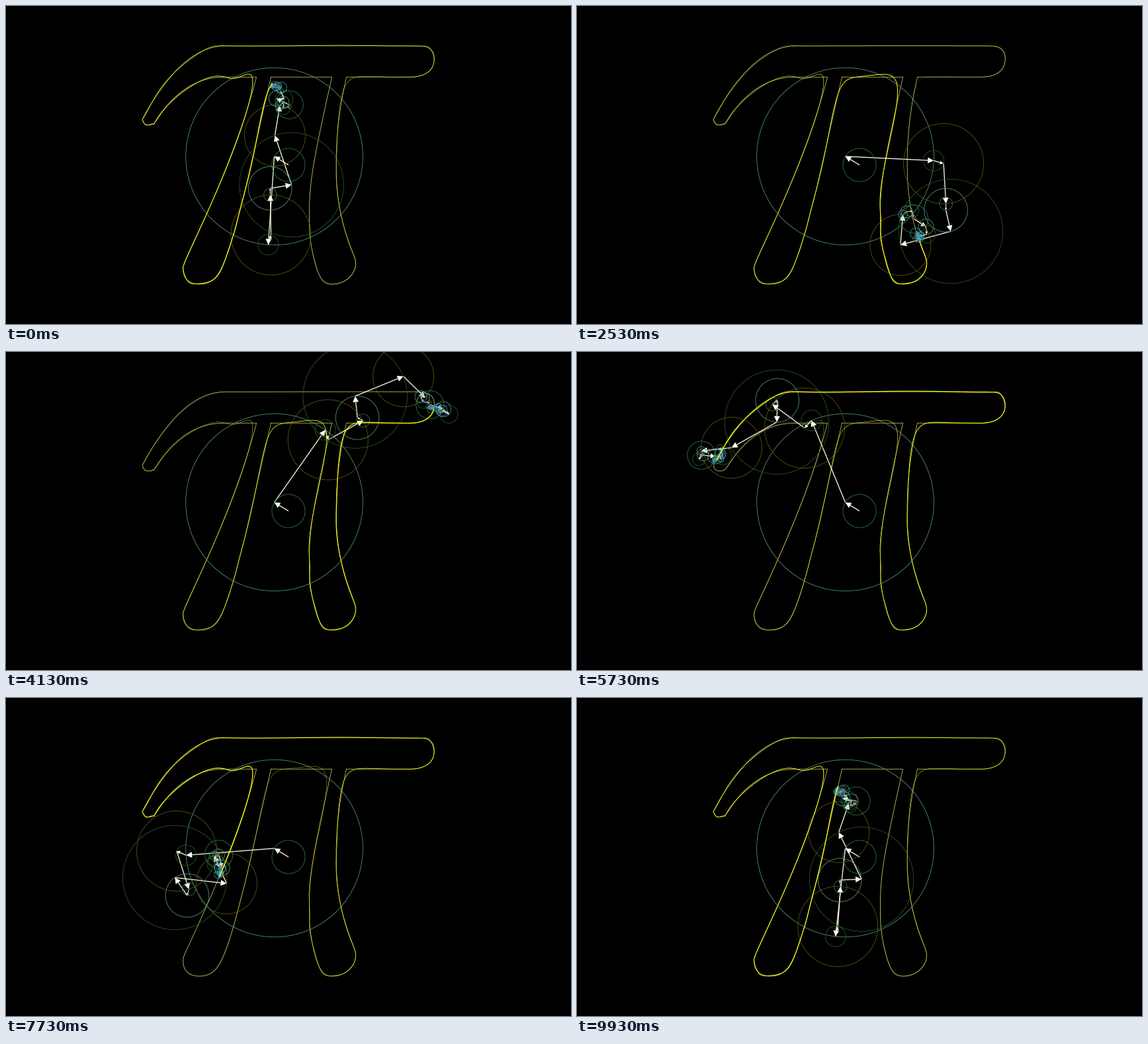
These frames come from a looping animation (854x480 px, 9.99 s). A matplotlib script:

```python
import numpy as np
import matplotlib.pyplot as plt
from matplotlib.animation import FuncAnimation
from matplotlib.collections import EllipseCollection, LineCollection, PolyCollection

W, H, DPI = 854, 480, 64           # a power of two keeps the size exact
FRAMES, LOOP_MS = 150, 9990
PT = 72 / DPI                      # points per pixel
MAX_FREQ = 25
PIECES, PIECE_STEPS = 300, 5
TIP, MAX_TIP_RATIO = 9, 0.35

# Glyph outline in font units, y down. One point makes a line, three a cubic.
START = (265, -373)
RIGHT_LEG = [
    [(378, -373)],
    [(345, -226), (336, -182), (336, -115)],
    [(336, -100), (336, -74), (344, -39)],
    [(354, 5), (365, 11), (380, 11)],
    [(400, 11), (422, -6), (422, -27)],
    [(422, -33), (422, -35), (416, -49)],
    [(386, -121), (386, -187), (386, -215)],
    [(386, -267), (393, -321), (405, -373)],
]
BAR = [
    [(518, -373)],
    [(532, -373), (568, -373), (568, -408)],
    [(568, -431), (546, -431), (527, -431)],
    [(191, -431)],
    [(169, -431), (132, -431), (88, -384)],
    [(53, -345), (27, -299), (27, -295)],
    [(27, -293), (27, -284), (39, -284)],
    [(47, -284), (49, -288), (55, -296)],
    [(103, -373), (162, -373), (182, -373)],
]
LEFT_LEG = [
    [(238, -373)],
    [(207, -252), (152, -132), (110, -41)],
    [(102, -25), (102, -23), (102, -16)],
    [(102, 5), (119, 11), (133, 11)],
    [(165, 11), (174, -19), (187, -53)],
    [(201, -100), (201, -102), (215, -154)],
    [START],
]


def to_plane(point):
    """Font units to pixels around the stage centre, y up."""
    x, y = point
    return complex(x - 297.5, -(y + 210)) * 360 / 442


def outline(steps):
    """Sample the glyph, giving every segment the same share of time."""
    s = np.arange(steps) / steps
    a, parts = to_plane(START), []
    for seg in RIGHT_LEG + BAR + LEFT_LEG:
        pts = [to_plane(p) for p in seg]
        d = pts[-1]
        b, c = pts[:2] if len(pts) == 3 else (a + (d - a) / 3, a + 2 * (d - a) / 3)
        parts.append(a * (1 - s)**3 + 3 * b * s * (1 - s)**2
                     + 3 * c * s**2 * (1 - s) + d * s**3)
        a = d
    return np.concatenate(parts)


def xy(z):
    return np.stack([z.real, z.imag], axis=-1)


# Fourier coefficients, ordered 0, 1, -1, 2, -2, ...
glyph = outline(400)
freqs = np.array(sorted(range(MAX_FREQ, -MAX_FREQ - 1, -1), key=abs))
times = np.arange(len(glyph)) / len(glyph)
coefs = np.array([np.mean(glyph * np.exp(-2j * np.pi * k * times)) for k in freqs])
radii = np.abs(coefs)


def arms(t):
    return coefs * np.exp(2j * np.pi * freqs * t)


# Approximated curve, cut into pieces for the fading trail
curve = np.array([arms(t).sum()
                  for t in np.linspace(0, 1, PIECES * PIECE_STEPS + 1)])
pieces = [xy(curve[i * PIECE_STEPS:(i + 1) * PIECE_STEPS + 1]) for i in range(PIECES)]
ages = (np.arange(PIECES) + 0.5) / PIECES

BIG_COLORS = ["#2f8552", "#57a585", "#2a6420", "#665c14"]
SMALL_COLORS = ["#29abca", "#58c4dd", "#1c758a", "#736357"]
circle_colors = [(BIG_COLORS if r > 9 else SMALL_COLORS)[i % 4]
                 for i, r in enumerate(radii)]

fig = plt.figure(figsize=(W / DPI, H / DPI), dpi=DPI, facecolor="black")
ax = fig.add_axes([0, 0, 1, 1])
ax.set_xlim(-W / 2, W / 2)
ax.set_ylim(-H / 2, H / 2)
ax.axis("off")

ax.plot(*xy(np.append(glyph, glyph[0])).T, color="#d0d078", lw=0.75 * PT,
        snap=False, zorder=1)
shafts = LineCollection([], colors="#fffce0", zorder=2, capstyle="butt",
                        linewidths=np.minimum(1.3, 0.1 * radii) * PT)
tips = PolyCollection([], facecolors="#fffff4", edgecolors="none", zorder=3)
circles = EllipseCollection(2 * radii, 2 * radii, 0 * radii, units="xy",
                            offsets=np.zeros((len(radii), 2)),
                            offset_transform=ax.transData, facecolors="none",
                            edgecolors=circle_colors, linewidths=0.75 * PT, zorder=4)
trail = LineCollection(pieces, colors="#ffff00", capstyle="butt", zorder=5)
for part in (shafts, tips, circles, trail):
    part.set_snap(False)
    ax.add_collection(part, autolim=False)


def draw(frame):
    t = frame / FRAMES
    vec = arms(t)
    ends = np.cumsum(vec)
    starts = ends - vec

    unit = vec / np.maximum(radii, 1e-9)
    size = np.minimum(TIP, MAX_TIP_RATIO * radii)
    base = ends - unit * size
    side = 0.5j * unit * size
    shafts.set_segments(xy(np.stack([starts, base], axis=1)))
    tips.set_verts(xy(np.stack([ends, base + side, base - side], axis=1)))
    circles.set_offsets(xy(starts))

    trail.set_linewidths(1.3 * PT * (1 - (t - ages) % 1))
    return shafts, tips, circles, trail


anim = FuncAnimation(fig, draw, frames=FRAMES, interval=LOOP_MS / FRAMES,
                     repeat=True, repeat_delay=0)
plt.show()
```
